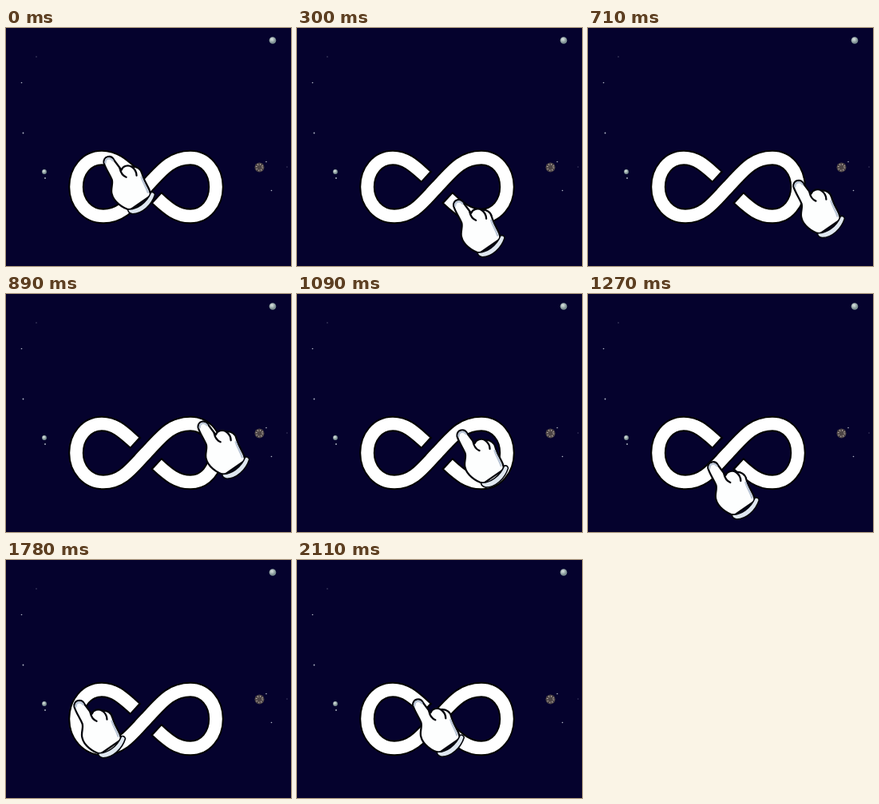
These frames come from a looping animation (357x298 px, 2140 ms). An HTML page:

```html
<!DOCTYPE html>
<html lang="en">
<head>
<meta charset="utf-8">
<title>Endless loop</title>
<style>
  html, body { margin: 0; width: 100%; height: 100%; overflow: hidden; background: #05022d; }
  svg { display: block; width: 357px; height: 298px; }
</style>
</head>
<body>
<svg viewBox="0 0 357 298" fill="none">
  <defs>
    <radialGradient id="pale" cx=".4" cy=".35">
      <stop stop-color="#dfe8e4"/><stop offset="1" stop-color="#7d9092"/>
    </radialGradient>
    <path id="band" d="M189.5 213.5C203 226 214 235.5 231 235.5C250 235.5 263 219 263 199
      C263 179 250 162.5 231 162.5C205 162.5 193 181 175.5 199S146 235.5 122 235.5
      C102 235.5 88 219 88 199C88 179 101 162.5 120 162.5C137 162.5 148 174 161 185.5"/>
  </defs>
  <rect width="357" height="298" fill="#05022d"/>

  <circle cx="334" cy="15.5" r="4.3" fill="url(#pale)"/>
  <circle cx="48" cy="180" r="2.9" fill="url(#pale)"/>
  <circle cx="317.5" cy="174.5" r="6" fill="#4b4344"/>
  <circle cx="317.5" cy="174.5" r="3.8" stroke="#b5aaa4" stroke-width="2" stroke-dasharray="1 2"/>
  <g fill="#b4b9c8">
    <circle cx="49" cy="188" r=".9"/>
    <circle cx="21.5" cy="131.5" r=".9"/>
    <circle cx="19.5" cy="68.5" r=".8"/>
    <circle cx="326" cy="167.5" r=".8"/>
    <circle cx="332.5" cy="203.5" r=".8"/>
    <circle cx="38" cy="36" r=".7" opacity=".5"/>
    <circle cx="352" cy="174" r=".7" opacity=".4"/>
  </g>

  <!-- The wide dark copy also peeks out past the cut ends -->
  <g stroke="#000" stroke-width="19.6">
    <use href="#band"/>
    <path d="M161 185.5l1.5 1.5M189.5 213.5l-1.5-1.5"/>
  </g>
  <use href="#band" stroke="#fff" stroke-width="15.6"/>

  <g id="hand" stroke="#05060c" stroke-width="2.3" stroke-linecap="round" stroke-linejoin="round">
    <path fill="#fdfefe" d="M1 9C0 1 10-2 14 6L23 18C25 13 31 11 36 14C42 13 48 17 49 23C51 31 55 36 58 43L60 50L34 68C24 66 13 57 11 48C9 42 13 35 11 30C8 23 3 16 1 9Z"/>
    <path stroke="#b9c5d6" d="M3 9C3 3 9 2 12 6M48 27C50 34 54 39 56 46"/>
    <path d="M21 16C22 21 24 25 29 27M36 14C40 17 42 20 42 25"/>
    <path fill="#dfe7f0" stroke-width="1.6" d="M31 67C42 68 55 59 60 46Q64 45 65 49C61 62 49 73 37 73Q31 72 31 67Z"/>
  </g>
</svg>
<script>
const LOOP = 2140, STEPS = 46;
const START = -0.573, TURN = 0.146; // phase at the first step, phase per step
const hand = document.getElementById("hand");

// The fingertip traces a figure eight; the sweep stops short of a full turn, so it jumps back.
function draw() {
  const step = Math.floor(performance.now() % LOOP / LOOP * STEPS);
  const phase = START + TURN * step;
  const x = 169 + 87.5 * Math.sin(phase);
  const y = 193 + 36.5 * Math.sin(2 * phase);
  hand.setAttribute("transform", `translate(${x} ${y})`);
  requestAnimationFrame(draw);
}
draw();
</script>
</body>
</html>
```
